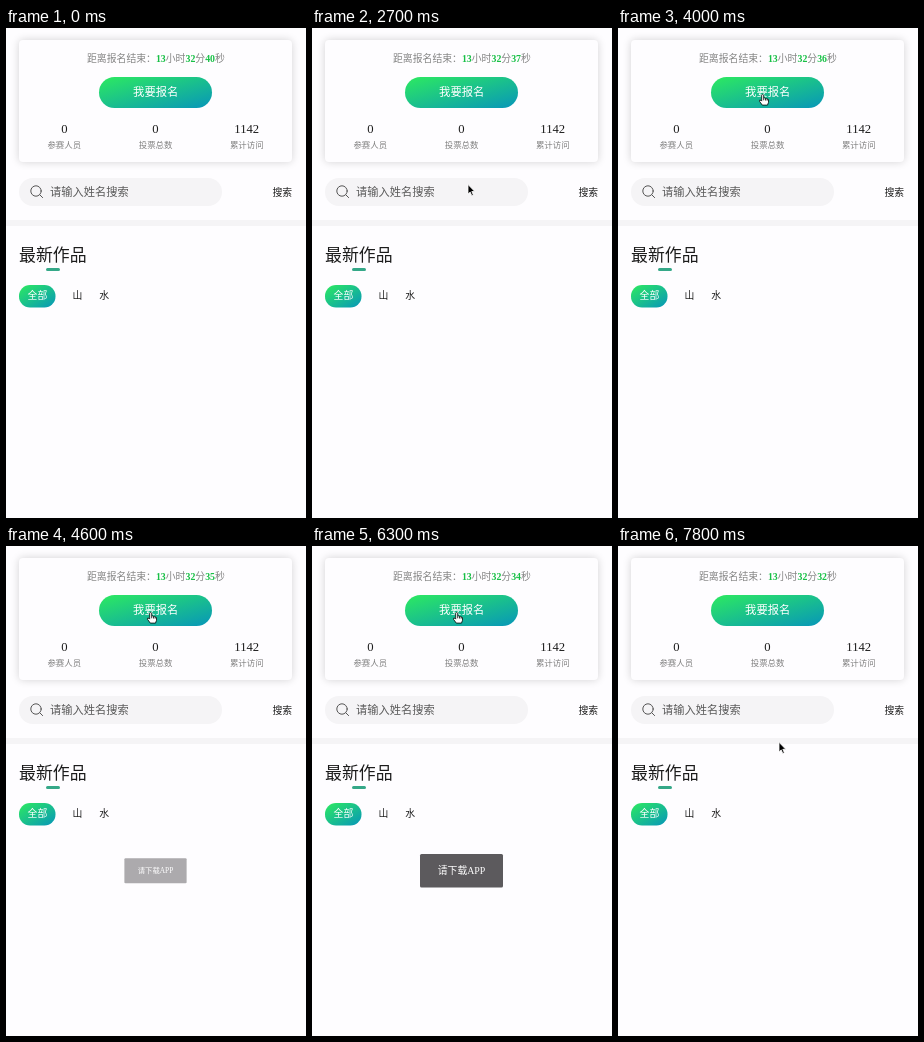
Animation of 300 by 490 pixels, one loop 8000 ms. Source, as an HTML page:

```html
<!DOCTYPE html>
<html lang="zh-CN">
<head>
<meta charset="utf-8">
<style>
  html, body { margin: 0; width: 100%; height: 100%; overflow: hidden; background: #fefdff; }
  svg { display: block; }
  text { font-family: "Liberation Serif", "Noto Sans CJK SC", "Noto Sans CJK", serif; font-size: 9.85px; fill: #1c1c1c; }
  .mid { text-anchor: middle; }
  .white { fill: #fff; font-weight: 500; }
  .grey { fill: #858585; }
  .label { font-size: 8.45px; fill: #808080; }
  .number { font-size: 12.65px; }
  .timer tspan { fill: #18c046; font-weight: bold; }
</style>
</head>
<body>
<svg width="300" height="490" viewBox="0 0 300 490">
  <defs>
    <linearGradient id="brand" x1="0" y1="0" x2="1" y2="1">
      <stop offset="0" stop-color="#2dea60"/>
      <stop offset="1" stop-color="#0796b9"/>
    </linearGradient>
    <filter id="soft" x="-10%" y="-20%" width="120%" height="140%">
      <feGaussianBlur stdDeviation="4.5"/>
    </filter>
  </defs>

  <rect width="300" height="490" fill="#fefdff"/>
  <rect x="13" y="12" width="273" height="122" rx="4" fill="#000" opacity=".17" filter="url(#soft)"/>
  <rect x="13" y="12" width="273" height="122" rx="4" fill="#fefdff"/>

  <text class="timer grey" x="81" y="34.3">距离报名结束：<tspan>13</tspan>小时<tspan>32</tspan>分<tspan id="seconds">40</tspan>秒</text>
  <rect x="93" y="49" width="113" height="31" rx="15.5" fill="url(#brand)"/>
  <text class="mid white" x="149.7" y="68.2" style="font-size:11.3px">我要报名</text>

  <g class="mid">
    <text class="number" x="58.3" y="105.2">0</text>
    <text class="number" x="149.5" y="105.2">0</text>
    <text class="number" x="240.7" y="105.2">1142</text>
    <text class="label" x="58.3" y="120">参赛人员</text>
    <text class="label" x="149.6" y="120">投票总数</text>
    <text class="label" x="240.8" y="120">累计访问</text>
  </g>

  <rect x="13" y="150" width="203" height="28" rx="14" fill="#f5f4f6"/>
  <g fill="none" stroke="#555" stroke-linecap="round">
    <circle cx="30" cy="163" r="5.2"/>
    <path d="M33.8 166.8 L36.6 169.6"/>
  </g>
  <text x="44" y="168" style="font-size:11.25px;fill:#5a5a5a">请输入姓名搜索</text>
  <text x="266.5" y="167.6">搜索</text>

  <rect y="192" width="300" height="6" fill="#f5f4f6"/>
  <text x="13" y="232.6" style="font-size:16.9px">最新作品</text>
  <rect x="40" y="240" width="14" height="3" rx="1.5" fill="#35a888"/>

  <rect x="13" y="257" width="36.5" height="22.5" rx="11" fill="url(#brand)"/>
  <text class="white" x="21.6" y="271.4">全部</text>
  <text x="66.5" y="271.4">山</text>
  <text x="93.3" y="271.4">水</text>

  <g id="toast">
    <rect x="-41.5" y="-16.75" width="83" height="33.5" rx="1.5" fill="#5c5a5d"/>
    <text class="mid white" y="3.1">请下载APP</text>
  </g>

  <path id="arrow" d="M0 0 V9.6 L2.2 7.6 L3.8 11.2 L5.4 10.5 L3.8 7 H6.8 Z"
        fill="#000" stroke="#fff" stroke-width=".8"/>
  <path id="hand" d="M-1 5.5 V.8 Q0 -.8 1 .8 V4 Q2 3 2.8 4.2 Q3.8 3.5 4.4 4.7 Q5.6 4.4 5.8 5.6 V8 L4.8 10.8 H-.4 L-3.2 7 Q-3.4 5 -1.8 6 L-1 6.8 Z M1 4 V6 M2.8 4.2 V6.2 M4.4 4.7 V6.4"
        fill="#fff" stroke="#000" stroke-width=".8" stroke-linejoin="round"/>
</svg>
<script>
  const el = id => document.getElementById(id);
  const clamp = v => Math.max(0, Math.min(1, v));
  const ease = p => p * p * (3 - 2 * p);

  const LOOP = 8000, STEP = 100;
  // Pointer stops: time, x, y
  const stops = [
    [2100, 267, 441], [2600, 156, 156.5], [2900, 156, 156.5], [3400, 144.7, 66.3],
    [7100, 144.7, 66.3], [7500, 161, 196.3], [LOOP, 161, 196.3]
  ];

  function pointerAt(t) {
    const i = stops.findIndex(s => s[0] > t);
    const [t0, x0, y0] = stops[i - 1], [t1, x1, y1] = stops[i];
    const p = ease((t - t0) / (t1 - t0));
    return [x0 + (x1 - x0) * p, y0 + (y1 - y0) * p];
  }

  function draw(t) {
    el("seconds").textContent = 40 - Math.floor((t + 500) / 1000);

    // The toast zooms from half size while fading, in and out
    const zoom = ease(clamp((t - 4450) / 300)) * ease(clamp((7500 - t) / 200));
    el("toast").setAttribute("opacity", zoom);
    el("toast").setAttribute("transform", `translate(149.5 324.75) scale(${0.5 + zoom / 2})`);

    const visible = t >= stops[0][0];
    const [x, y] = visible ? pointerAt(t) : [0, 0];
    const overButton = y > 49 && y < 80;
    for (const [id, shown] of [["arrow", visible && !overButton], ["hand", visible && overButton]]) {
      el(id).setAttribute("transform", `translate(${x} ${y})`);
      el(id).setAttribute("visibility", shown ? "visible" : "hidden");
    }
  }

  const start = performance.now();
  function tick() {
    const t = (performance.now() - start) % LOOP;
    draw(Math.floor(t / STEP) * STEP);
    requestAnimationFrame(tick);
  }
  tick();
</script>
</body>
</html>
```
